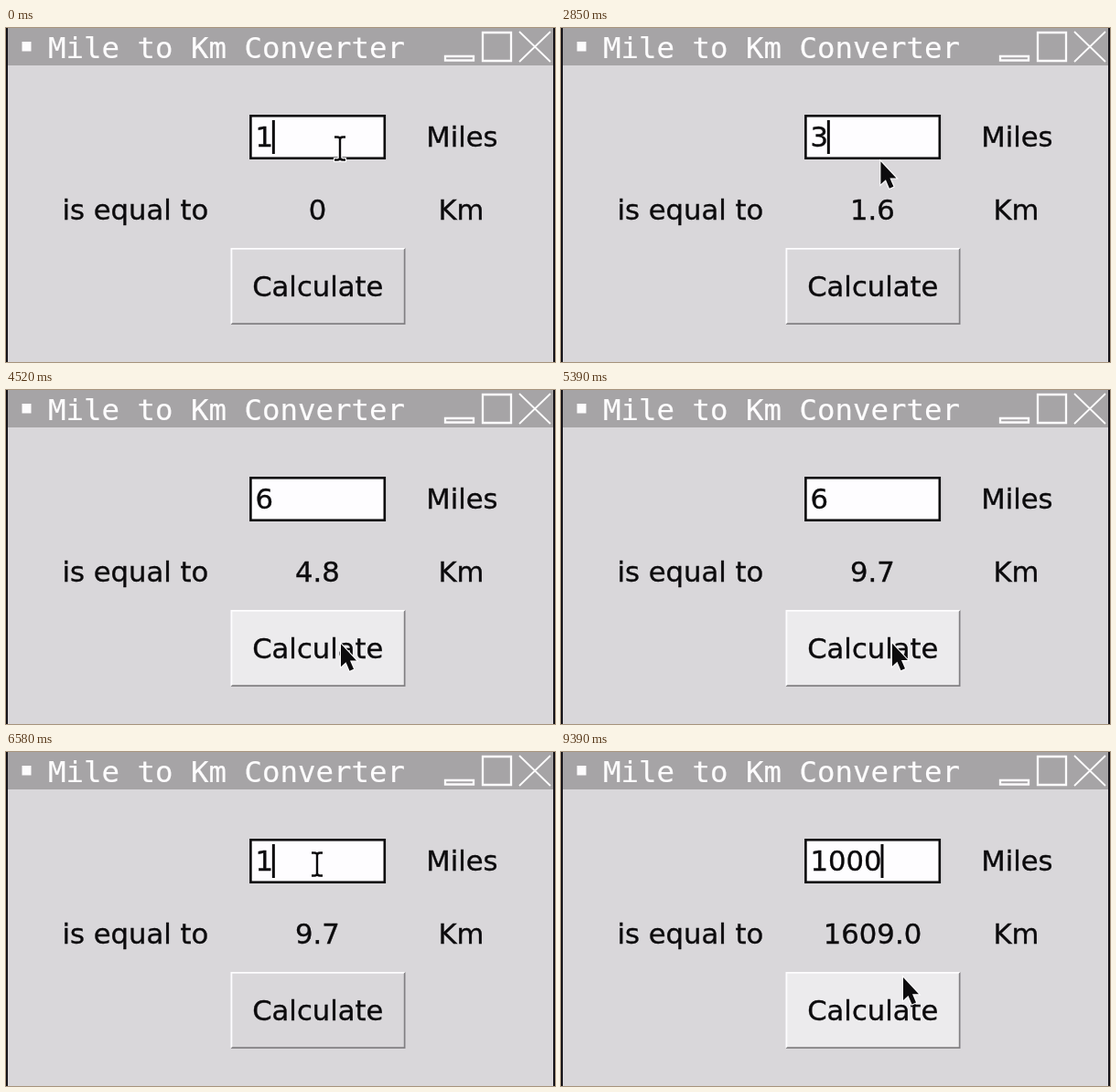
Write an HTML page that moves like this. It is 600 by 366 pixels and loops after 10 s.

```html
<!DOCTYPE html>
<html lang="en">
<head>
<meta charset="utf-8">
<title>Mile to Km Converter</title>
<style>
html, body { margin: 0; width: 100%; height: 100%; overflow: hidden; background: #d9d7da; }
svg { display: block; width: 100vw; height: 100vh; }
text { font: 30.7px "DejaVu Sans", sans-serif; fill: #0c0b0d; stroke: #0c0b0d; stroke-width: .35; white-space: pre; }
.title { font: 32.4px "DejaVu Sans Mono", monospace; fill: #fdfcfd; stroke: #fdfcfd; stroke-width: .2; }
.mid { text-anchor: middle; }
.line { fill: none; stroke: #fdfcfd; stroke-width: 2.3; }
</style>
</head>
<body>
<svg viewBox="0 0 600 366">
  <rect width="600" height="366" fill="#d9d7da"/>
  <rect width="600" height="41" fill="#a6a4a6"/>
  <path d="M0 0H2V366H0zM598 0H600V366H598z" fill="#141218"/>
  <rect x="17.5" y="15" width="10" height="10.5" fill="#fdfcfd"/>
  <text class="title" x="46" y="33">Mile to Km Converter</text>
  <path class="line" d="M480 31H511V35.5H480zM521 5H552V36H521z"/>
  <path class="line" style="stroke-width:1.8" d="M561 4L595 37M595 4L561 37"/>

  <rect x="267.4" y="96.3" width="146.4" height="46.4" fill="#fefdff" stroke="#0c0b0d" stroke-width="2.6"/>
  <rect id="sel" x="272.5" y="101" height="37" fill="#c3c1c4"/>
  <text id="entry" x="272.5" y="130.4"></text>
  <rect id="caret" y="101" width="3" height="37" fill="#0c0b0d"/>
  <text x="459.2" y="130.4">Miles</text>
  <text x="61.4" y="210.4">is equal to</text>
  <text id="result" class="mid" x="340.5" y="210.4"></text>
  <text x="472.4" y="210.4">Km</text>

  <rect id="face" x="246" y="242" width="190" height="82"/>
  <path id="lit" d="M245.5 325V241H436.5L434.8 242.8H247.3V323.2z"/>
  <path id="shade" d="M245.5 325H436.5V241L434.8 242.8V323.2H247.3z"/>
  <text id="label" class="mid" x="340.8" y="293.8">Calculate</text>

  <path id="arrow" d="M0 0V25L5.5 20L9.5 29.5L14 27.5L10 18.3H17z" fill="#0c0b0d" stroke="#fdfcfd" stroke-width="2.2" paint-order="stroke"/>
  <g id="beam" fill="none">
    <path d="M-7 -12.5H-3Q0 -12.5 0 -9.5Q0 -12.5 3 -12.5H7M0 -10V10M-7 12.5H-3Q0 12.5 0 9.5Q0 12.5 3 12.5H7" stroke="#fefdff" stroke-width="5"/>
    <path d="M-6 -12.5H-3Q0 -12.5 0 -9.5Q0 -12.5 3 -12.5H6M0 -10V10M-6 12.5H-3Q0 12.5 0 9.5Q0 12.5 3 12.5H6" stroke="#0c0b0d" stroke-width="2.4"/>
  </g>
</svg>
<script>
const LOOP = 10000, DIGIT = 19.55, KM_PER_MILE = 1.609, REST = 830;
const $ = id => document.getElementById(id);
const show = (id, on) => $(id).setAttribute("visibility", on ? "visible" : "hidden");

// each round: select the old value, type a new one, press the button
const rounds = [
  { miles: "1", select: 0, type: 0, down: 420, up: 470 },
  { miles: "3", select: 1030, type: 2300, down: 3060, up: 3150 },
  { miles: "6", select: 3730, type: 3850, down: 4880, up: 5090 },
  { miles: "1000", select: 6240, type: 6580, finish: 7550, down: 8500, up: 8560 }
];

// pointer glides: start, end, x, y
const home = [365, 132];
const glides = [
  [250, 400, 346, 268], [500, 730, 351, 105],
  [2830, 2910, 345, 262], [3200, 3330, 313, 142], [3330, 3550, 340, 120],
  [4340, 4520, 366, 278], [4520, 4670, 368, 306], [4850, 4880, 362, 278],
  [5390, 5970, 340, 123], [8400, 8500, 345, 266], [8700, 8730, 374, 247]
];

function pointer(t) {
  let [x, y] = home;
  for (const [start, end, toX, toY] of glides) {
    const p = Math.min(1, Math.max(0, (t - start) / (end - start)));
    x += (toX - x) * p;
    y += (toY - y) * p;
  }
  return [x, y];
}

function draw(t) {
  const [x, y] = pointer(t);
  const inEntry = x > 267 && x < 414 && y > 96 && y < 141;
  const hover = x > 246 && x < 436 && y > 242 && y < 324;

  const n = rounds.findLastIndex(r => r.select <= t);
  const now = rounds[n];
  const selected = t < now.type;
  const pressed = t >= now.down && t < now.up;
  const done = t >= now.up ? now : rounds[n - 1];
  const text = selected ? rounds[n - 1].miles
    : t < now.finish ? now.miles[0] : now.miles;
  const end = text.length * DIGIT;

  $("entry").textContent = text;
  $("sel").setAttribute("width", end);
  $("caret").setAttribute("x", 271.3 + end);
  show("sel", selected);
  show("caret", !selected && (!hover || t >= now.up + REST));
  $("result").textContent = done ? (done.miles * KM_PER_MILE).toFixed(1) : "0";

  $("face").setAttribute("fill", hover ? "#ecebed" : "#d9d7da");
  $("lit").setAttribute("fill", pressed ? "#828083" : "#fefdff");
  $("shade").setAttribute("fill", pressed ? "#fefdff" : "#828083");
  $("label").setAttribute("transform", pressed ? "translate(2 2)" : "");

  show("beam", inEntry);
  show("arrow", !inEntry);
  $(inEntry ? "beam" : "arrow").setAttribute("transform", `translate(${x} ${y})`);
}

const start = performance.now();
function tick() {
  draw((performance.now() - start) % LOOP);
  requestAnimationFrame(tick);
}
tick();
</script>
</body>
</html>
```
